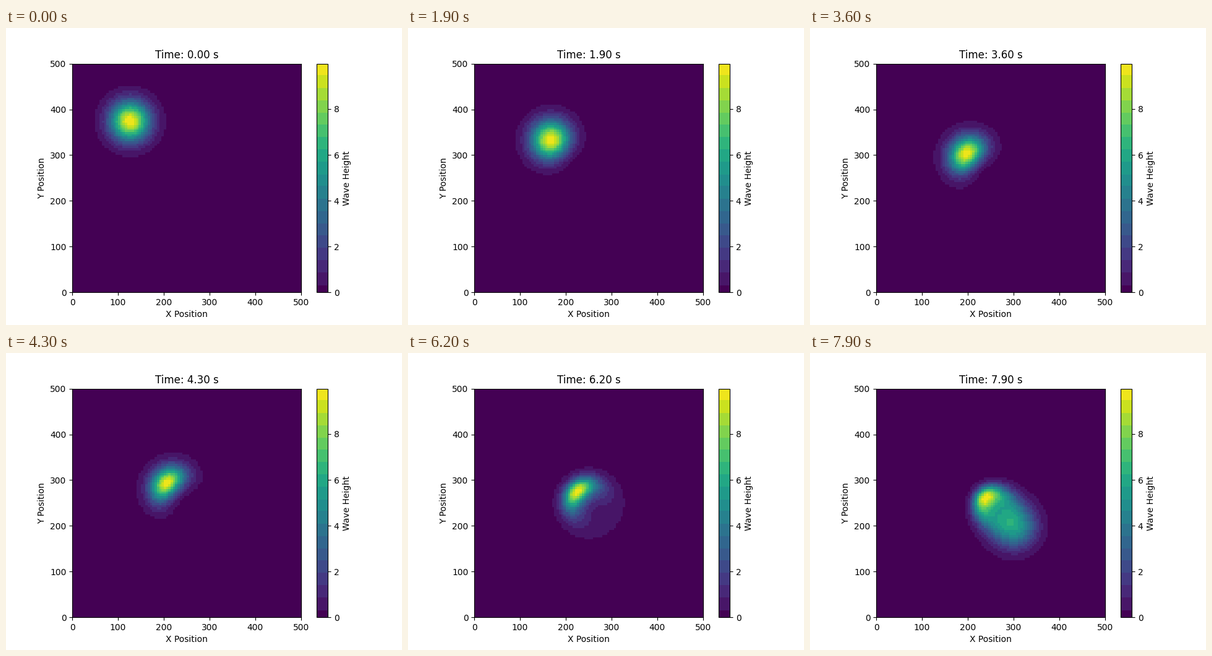
Write a matplotlib script that moves like this. It is 640 px wide and 480 px high and loops after 8 s.

```python
import numpy as np
import matplotlib.pyplot as plt
from matplotlib.animation import FuncAnimation
from matplotlib.colors import ListedColormap

SIZE, CELLS = 500, 100
FRAMES, STEP = 80, 0.1
GRAVITY, DEPTH = 9.81, 100
SHOAL_HEIGHT, SHOAL_WIDTH = 60, 50
PEAK, WIDTH = 10, 30
START = (125, 375)

axis = np.linspace(0, SIZE, CELLS)
X, Y = np.meshgrid(axis, axis)


def bump(dx, dy, height, width):
    return height * np.exp(-(dx**2 + dy**2) / (2 * width**2))


# Shallow-water speed, slower over the shoal in the middle
depth = DEPTH - bump(X - SIZE / 2, Y - SIZE / 2, SHOAL_HEIGHT, SHOAL_WIDTH)
speed = np.sqrt(GRAVITY * depth) / np.sqrt(2)


def wave(t):
    shift = speed * t
    return bump(X - START[0] - shift, Y - START[1] + shift, PEAK, WIDTH)


def banded_viridis(first=8, bands=18):
    """Viridis in flat steps, with a narrow band at the bottom."""
    step = (256 - first) / bands
    index = np.arange(256)
    band = np.floor((index - first) / step)
    middle = first + (band + 0.5) * step
    index = np.where(index < first, 0, middle).astype(int)
    return ListedColormap(plt.get_cmap("viridis")(index))


fig, ax = plt.subplots(figsize=(6.4, 4.8), dpi=100)
first = wave(0)
image = ax.imshow(first, extent=(0, SIZE, 0, SIZE), origin="lower",
                  cmap=banded_viridis(), vmin=0, vmax=first.max(),
                  interpolation="nearest")
fig.colorbar(image, ax=ax, label="Wave Height")
ax.set_xlabel("X Position")
ax.set_ylabel("Y Position")
title = ax.set_title("Time: 0.00 s")


def update(frame):
    t = frame * STEP
    image.set_data(wave(t))
    title.set_text(f"Time: {t:.2f} s")
    return image, title


anim = FuncAnimation(fig, update, frames=FRAMES, interval=1000 * STEP,
                     repeat=True, repeat_delay=0, blit=False)
plt.show()
```
